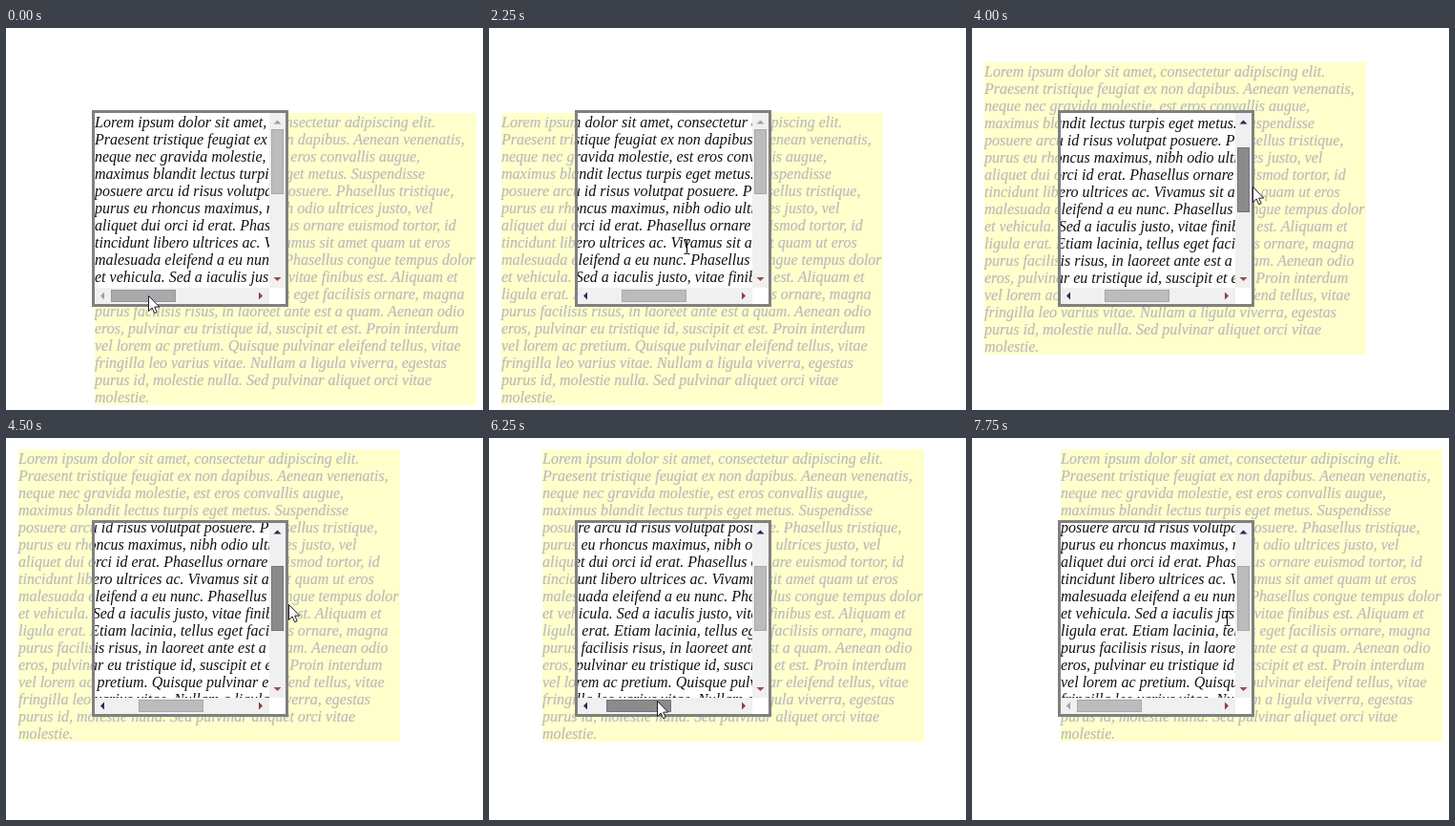
Write an HTML page that moves like this. It is 500x400 px and loops after 8 s.

```html
<!DOCTYPE html>
<html lang="en">
<head>
<meta charset="utf-8">
<title>Scrolling box</title>
<style>
  html, body { margin: 0; width: 100%; height: 100%; overflow: hidden; background: #fff; }
  svg { display: block; width: 500px; height: 400px; }
  text { font: italic 16px "Liberation Serif", "Times New Roman", serif; }
</style>
</head>
<body>
<svg viewBox="0 0 500 400">
  <defs>
    <g id="copy"></g>
    <clipPath id="view"><rect x="93" y="89" width="183" height="183"/></clipPath>
  </defs>

  <g id="page">
    <rect width="400" height="306" fill="#ffffcc"/>
    <use href="#copy" fill="#bbb" stroke="#bbb" stroke-width=".2"/>
  </g>

  <rect x="91.5" y="87.5" width="203" height="203" fill="#fff" stroke="#808080" stroke-width="3"/>
  <g clip-path="url(#view)"><use id="inner" href="#copy" fill="#111"/></g>

  <path d="M276 89h17v183h-17zM93 272h183v17h-183z" fill="#f0f0f0"/>
  <path id="up" d="M280.5 100.5h8l-4-4z"/>
  <path d="M280.5 261h8l-4 4z" fill="#a04a40"/>
  <path id="left" d="M103 276.5v8l-4-4z"/>
  <path d="M265 276.5v8l4-4z" fill="#903c3c"/>
  <rect id="vThumb" x="278.5" width="12" height="67"/>
  <rect id="hThumb" y="274.5" width="67" height="12"/>

  <path id="arrow" d="M.5.5v16l3.7-3.5 2.5 5.7 2.5-1.1-2.5-5.5h5z" fill="#fff" stroke="#20182c"/>
  <path id="beam" d="M-3-7.5h2.5l.5.5.5-.5H3M0-7V7M-3 7.5h2.5L0 7l.5.5H3" fill="none" stroke="#000"/>
</svg>

<script>
const LOOP = 8000, STEP = 250;
const RATIO = (400 - 183) / (149 - 68);   // content travel per thumb travel

const lines = `Lorem ipsum dolor sit amet, consectetur adipiscing elit.
Praesent tristique feugiat ex non dapibus. Aenean venenatis,
neque nec gravida molestie, est eros convallis augue,
maximus blandit lectus turpis eget metus. Suspendisse
posuere arcu id risus volutpat posuere. Phasellus tristique,
purus eu rhoncus maximus, nibh odio ultrices justo, vel
aliquet dui orci id erat. Phasellus ornare euismod tortor, id
tincidunt libero ultrices ac. Vivamus sit amet quam ut eros
malesuada eleifend a eu nunc. Phasellus congue tempus dolor
et vehicula. Sed a iaculis justo, vitae finibus est. Aliquam et
ligula erat. Etiam lacinia, tellus eget facilisis ornare, magna
purus facilisis risus, in laoreet ante est a quam. Aenean odio
eros, pulvinar eu tristique id, suscipit et est. Proin interdum
vel lorem ac pretium. Quisque pulvinar eleifend tellus, vitae
fringilla leo varius vitae. Nullam a ligula viverra, egestas
purus id, molestie nulla. Sed pulvinar aliquet orci vitae
molestie.`.split('\n');

// Spans of the three drags
const dragRight = [750, 1860], dragDown = [3250, 4440], dragLeft = [5500, 6930];

// Pointer moves: span, then where it ends
const home = { x: 149, y: 280 };
const moves = [
  { span: dragRight, x: 179, y: 287 },
  { span: [2000, 2250], x: 208, y: 229 },
  { span: [2250, 3000], x: 289, y: 147 },
  { span: dragDown, x: 296, y: 174 },
  { span: [4500, 5500], x: 191, y: 277 },
  { span: dragLeft, x: 163, y: 274 },
  { span: [7000, 7750], x: 268, y: 189 }
];

const $ = id => document.getElementById(id);
const set = (id, attrs) => {
  for (const k in attrs) $(id).setAttribute(k, attrs[k]);
};
const place = (id, x, y) => set(id, { transform: `translate(${x} ${y})` });
const within = (v, lo, hi) => v >= lo && v < hi;

function ease(t, [from, to]) {
  const p = Math.min(1, Math.max(0, (t - from) / (to - from)));
  return p * p * (3 - 2 * p);
}

const held = (t, [from, to]) => t > from && t < to + STEP;

function pointerAt(t) {
  let { x, y } = home;
  for (const m of moves) {
    const e = ease(t, m.span);
    x += (m.x - x) * e;
    y += (m.y - y) * e;
  }
  return [Math.round(x), Math.round(y)];
}

function paintThumb(id, axis, pos, drag, hover) {
  const [fill, stroke] = drag ? ['#8b8b8b', '#787080']
    : hover ? ['#a9a9ac', '#98989c'] : ['#bcbcbc', '#a8a8a8'];
  set(id, { [axis]: pos + 0.5, fill, stroke });
}

function draw(ms) {
  const t = Math.floor(ms % LOOP / STEP) * STEP;
  const sx = Math.round(80 * (ease(t, dragRight) - ease(t, dragLeft)));
  const sy = Math.round(77 * ease(t, dragDown));
  const [px, py] = pointerAt(t);

  place('page', 93 - sx, 89 - sy);
  place('inner', 93 - sx, 89 - sy);

  const hx = 110 + Math.floor(sx / RATIO), vy = 106 + Math.floor(sy / RATIO);
  paintThumb('hThumb', 'x', hx, held(t, dragRight) || held(t, dragLeft),
    within(px, hx, hx + 68) && within(py, 274, 287));
  paintThumb('vThumb', 'y', vy, held(t, dragDown),
    within(px, 278, 291) && within(py, vy, vy + 68));
  set('left', { fill: sx ? '#3a2058' : '#a0a0a8' });
  set('up', { fill: sy ? '#3a2058' : '#a0a0a8' });

  const overText = within(px, 93, 276) && within(py, 89, 272);
  set('arrow', { visibility: overText ? 'hidden' : 'visible' });
  set('beam', { visibility: overText ? 'visible' : 'hidden' });
  place('arrow', px, py);
  place('beam', px - 0.5, py);
}

$('copy').innerHTML = lines.map((s, i) => `<text y="${15 + 18 * i}">${s}</text>`).join('');

const start = performance.now();
function tick() {
  draw(performance.now() - start);
  requestAnimationFrame(tick);
}
tick();
</script>
</body>
</html>
```
